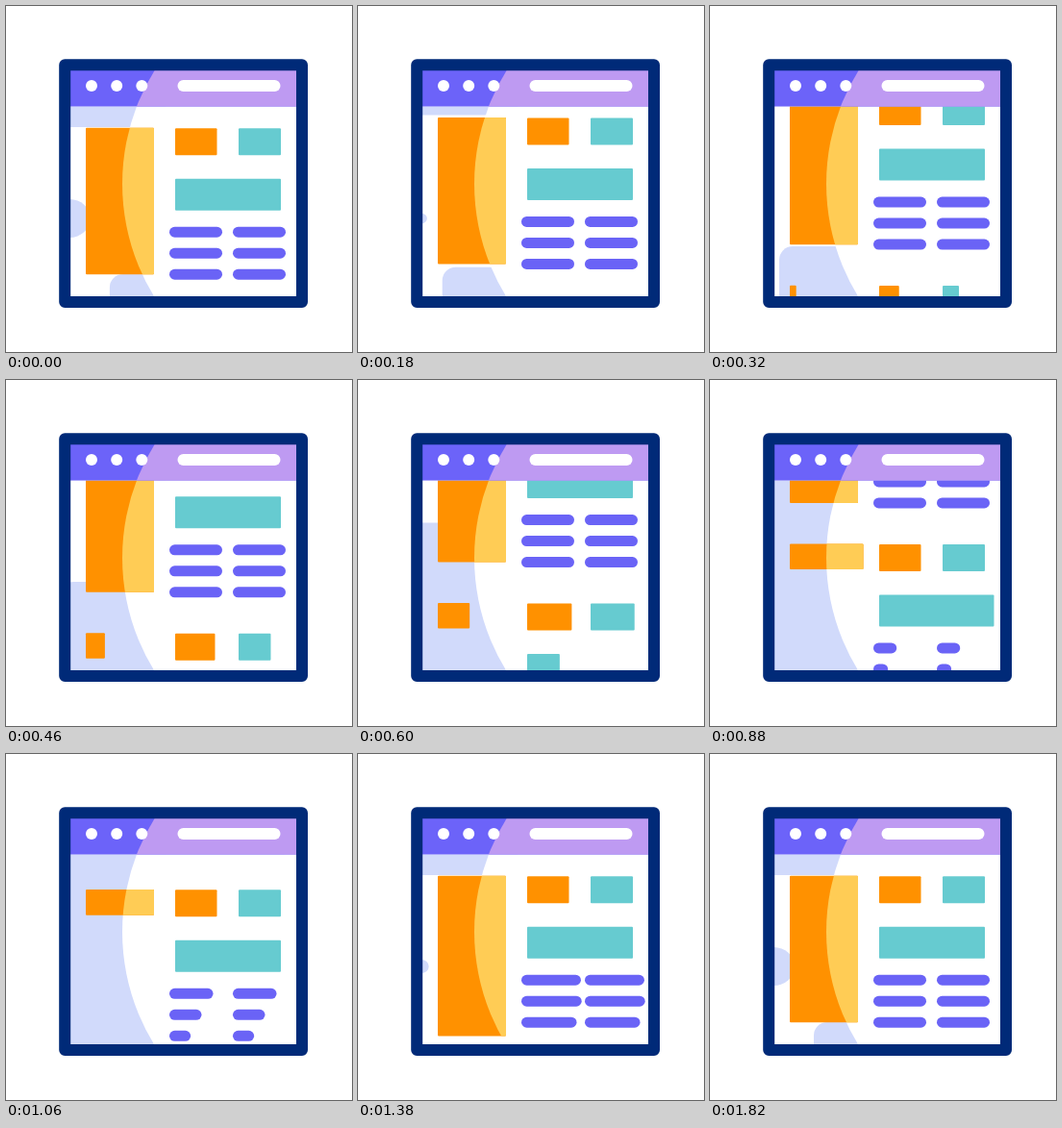
An HTML page for the animation above (2020 ms loop, 360x360 px).

```html
<!DOCTYPE html>
<html lang="en">
<head>
<meta charset="utf-8">
<title>Scrolling page</title>
<style>
  html, body { margin: 0; width: 100%; height: 100%; overflow: hidden; background: #fff; }
  svg { display: block; width: 100vw; height: 100vh; }
</style>
</head>
<body>
<svg viewBox="0 0 360 360">
  <defs>
    <clipPath id="view"><rect x="66" y="104.5" width="237" height="198"/></clipPath>
    <clipPath id="top"><rect x="66" y="66" width="237" height="38.5"/></clipPath>
    <clipPath id="shine"><circle id="lens" cx="345" cy="185" r="224"/></clipPath>
  </defs>
  <g clip-path="url(#view)">
    <rect x="66" y="104" width="100" height="200" fill="#d1dafb"/>
    <g id="backdrop"></g>
    <use href="#lens" fill="#fff"/>
    <g id="pages"></g>
  </g>
  <g clip-path="url(#top)">
    <rect x="66" y="66" width="237" height="39" fill="#6c63f9"/>
    <use href="#lens" fill="#be9af2"/>
    <g fill="#fff">
      <circle cx="89" cy="83" r="6"/>
      <circle cx="115.2" cy="83" r="6"/>
      <circle cx="141.3" cy="83" r="6"/>
      <rect x="178.5" y="77" width="107" height="12" rx="6"/>
    </g>
  </g>
  <rect x="61.2" y="61.2" width="246.8" height="246.8" fill="none"
        stroke="#002a78" stroke-width="12" stroke-linejoin="round"/>
</svg>
<script>
const LOOP = 2020, SCROLL_TIME = 1270, PAGE_STEP = 195;
const ORANGE = '#ff9100', AMBER = '#ffcc55', TEAL = '#66cbd0', VIOLET = '#6a63f6', PALE = '#d1dafb';
const backdrop = document.getElementById('backdrop');
const pages = document.getElementById('pages');

const clamp = x => Math.min(1, Math.max(0, x));
const smooth = x => x * x * (3 - 2 * x);
const linear = x => x;

// Keys are [time, value] pairs.
function tween(t, keys, ease = smooth) {
  let i = 0;
  while (i < keys.length - 2 && t >= keys[i + 1][0]) i++;
  const [[t0, from], [t1, to]] = [keys[i], keys[i + 1]];
  return from + (to - from) * ease(clamp((t - t0) / (t1 - t0)));
}

// Grows from nothing past the full size, then settles.
const pop = (t, start, rise, peak, full, settle) =>
  tween(t, [[start, 0], [start + rise, peak], [start + rise + settle, full]]);

const box = (x, y, w, h, fill, extra = '') => w > 0
  ? `<rect x="${x}" y="${y}" width="${w}" height="${h}" rx="1" fill="${fill}" ${extra}/>` : '';

const bar = (x, y, length) => length > 0
  ? `<path d="M${x + 5.5} ${y}h${length}" stroke="${VIOLET}" stroke-width="11" stroke-linecap="round"/>` : '';

// White sheet with a pale notch at its side and a pale tide that rises from below.
function sheet(t) {
  const tide = tween(t, [[0, 0], [1060, 3.3], [1360, -0.5], [1440, -0.5], [1820, 0]], linear);
  const lift = tide > 0 ? 29 * tide ** 2.4 : 60 * tide;
  const notch = clamp(1 - 1.3 * Math.abs(tide));
  return box(66, 126 - 22 * clamp(tide), 100, 220, '#fff')
    + `<ellipse cx="66" cy="221" rx="${22 * notch}" ry="${20 * notch}" fill="${PALE}"/>`
    + `<rect x="${108 - 36 * tide}" y="${279 - lift}" width="300" height="900" rx="14" fill="${PALE}"/>`;
}

function page(dy, size) {
  let out = box(83, 126.8 + dy, size.tallW, size.tallH, ORANGE)
    + box(83, 126.8 + dy, size.tallW, size.tallH, AMBER, 'clip-path="url(#shine)"')
    + box(176, 127.2 + dy, size.small, 28, ORANGE)
    + box(242, 127.2 + dy, size.side, 28, TEAL)
    + box(176, 179.7 + dy, size.wide, 33, TEAL);
  size.rows.forEach((length, i) => {
    const y = 235.2 + 22 * i + dy;
    out += bar(170, y, length) + bar(236, y, length);
  });
  return out;
}

const growing = t => ({
  tallW: tween(t, [[250, 0], [600, 33], [840, 78], [1040, 71]], linear),
  tallH: tween(t, [[1050, 26.5], [1400, 168], [1720, 152.5]]),
  small: pop(t, 123, 430, 47, 43.5, 180),
  side: pop(t, 80, 600, 48, 44, 180),
  wide: pop(t, 450, 430, 119.5, 110, 180),
  rows: [670, 770, 870].map(start => pop(t, start, 640, 52, 44, 310))
});
const FULL = growing(LOOP);

function draw(t) {
  const scroll = PAGE_STEP * smooth(clamp(t / SCROLL_TIME));
  backdrop.innerHTML = sheet(t);
  pages.innerHTML = page(-scroll, FULL) + page(PAGE_STEP - scroll, growing(t));
}

const begin = performance.now();
function tick() {
  draw((performance.now() - begin) % LOOP);
  requestAnimationFrame(tick);
}
tick();
</script>
</body>
</html>
```
